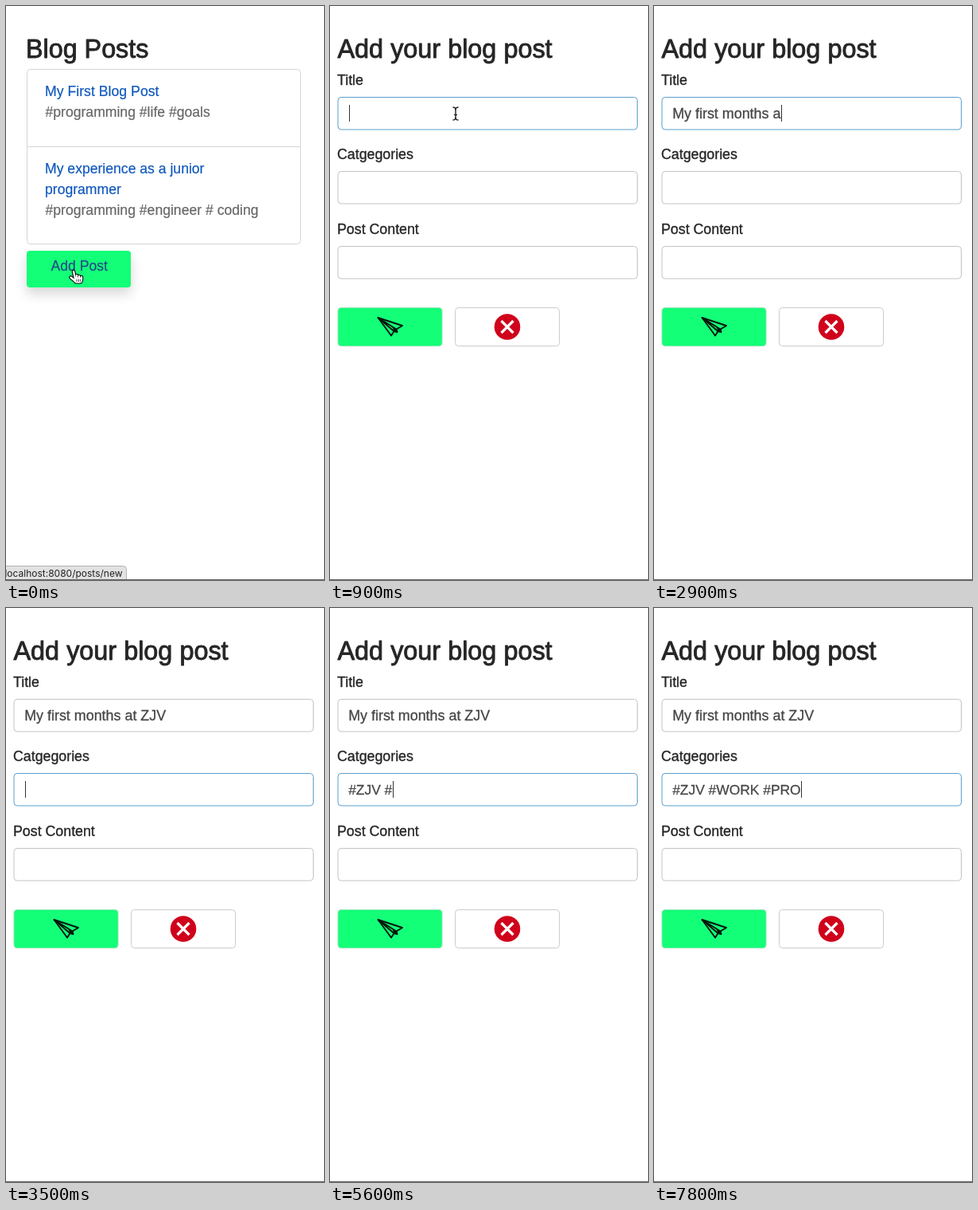
Recreate the animation shown at these times as an HTML page with a canvas. Size 400x720 px, loop 8 s.

```html
<!DOCTYPE html>
<html lang="en">
<head>
<meta charset="utf-8">
<title>Blog post form</title>
<style>
  html, body { margin: 0; width: 400px; height: 720px; overflow: hidden; background: #fff; }
  canvas { display: block; }
</style>
</head>
<body>
<canvas id="stage" width="400" height="720"></canvas>
<script>
const ctx = document.getElementById('stage').getContext('2d');
const LOOP = 8000;
const STEP = 100;
const SANS = '"Liberation Sans", Arial, sans-serif';
const GREEN = '#14ff78';
const INK = '#262626';
const PAGE_OPENS = 100, TITLE_FOCUS = 900, TITLE_TYPING = 1200, TAG_FOCUS = 3500;

const clamp = v => Math.min(1, Math.max(0, v));
const mix = (a, b, k) => a + (b - a) * k;
const ease = k => k * k * (3 - 2 * k);

// Part of a text typed by time t, one letter every `pace` ms.
const typing = (t, start, pace, str) =>
  str.slice(0, Math.max(0, 1 + Math.floor((t - start) / pace)));

const titleAt = t =>
  typing(t, TITLE_TYPING, 70, 'My first months') + typing(t, 2800, 75, ' at ZJV');

const tagsAt = t =>
  typing(t, 3700, 360, '#ZJV #') + typing(t, 5700, 260, 'WORK #PRO');

function text(str, x, y, size, color, weight = .2) {
  ctx.font = `${size}px ${SANS}`;
  ctx.fillStyle = ctx.strokeStyle = color;
  ctx.lineWidth = weight;
  ctx.lineJoin = 'round';
  ctx.fillText(str, x, y);
  ctx.strokeText(str, x, y);
}

function box(x, y, w, h, fill, stroke) {
  ctx.beginPath();
  ctx.roundRect(x + .5, y + .5, w, h, 4);
  ctx.fillStyle = fill;
  ctx.fill();
  if (stroke) {
    ctx.strokeStyle = stroke;
    ctx.lineWidth = 1;
    ctx.stroke();
  }
}

function line(x1, y1, x2, y2, color, width = 1) {
  ctx.beginPath();
  ctx.moveTo(x1, y1);
  ctx.lineTo(x2, y2);
  ctx.strokeStyle = color;
  ctx.lineWidth = width;
  ctx.stroke();
}

function at(x, y, draw) {
  ctx.save();
  ctx.translate(x, y);
  draw();
  ctx.restore();
}

// Palm and fingers as rounded strokes: a dark pass, then a thinner white one.
function hand() {
  ctx.lineCap = 'round';
  for (const [color, grow] of [['#000', 2.2], ['#fff', 0]]) {
    line(0, 2, 2, 11, color, 2.4 + grow);
    for (let i = 1; i < 4; i++) line(1 + 3 * i, 6 + i, 1 + 3 * i, 12, color, 2.4 + grow);
    line(-3.5, 9.5, 2, 14, color, 2.4 + grow);
    line(4, 13, 7.5, 13, color, 7 + grow);
  }
  for (let i = 0; i < 3; i++) line(4 + 2.4 * i, 12, 4 + 2.4 * i, 14.5, '#222', .9);
}

function arrow() {
  const path = new Path2D('M0 0V14L3.3 11L5.5 16L8 15L5.7 10H10Z');
  ctx.fillStyle = '#000';
  ctx.fill(path);
  ctx.strokeStyle = '#fff';
  ctx.stroke(path);
}

function beam() {
  line(0, -6, 0, 6, '#222', 1.4);
  line(-2, 1.5, 2, 1.5, '#222', 1.4);
  for (const s of [-1, 1]) {
    ctx.beginPath();
    ctx.moveTo(-3.5, 8 * s);
    ctx.quadraticCurveTo(0, 8 * s, 0, 5 * s);
    ctx.quadraticCurveTo(0, 8 * s, 3.5, 8 * s);
    ctx.stroke();
  }
}

function plane() {
  ctx.strokeStyle = ctx.fillStyle = '#04170c';
  ctx.lineWidth = 1.9;
  ctx.lineJoin = 'round';
  ctx.stroke(new Path2D('M-15 -11L15.5 -1L8 3.5L9 7L5 6L1.5 11.5Z'));
  ctx.stroke(new Path2D('M8 3.5L-15 -11L5 6'));
  ctx.fill(new Path2D('M3 1L8 3.5L9 7L5 6Z'));
}

function cross() {
  ctx.beginPath();
  ctx.arc(0, 0, 16.3, 0, 2 * Math.PI);
  ctx.fillStyle = '#d0021b';
  ctx.fill();
  for (const s of [-1, 1]) line(-7.5, -7.5 * s, 7.5, 7.5 * s, '#fff', 3.2);
}

function listPage() {
  const link = '#0f58bd', gray = '#666', border = '#d6d6d6';
  text('Blog Posts', 25, 65, 32.3, INK, .9);
  box(26, 79, 344, 219, '#fff', border);
  line(26, 176.5, 370, 176.5, border);
  text('My First Blog Post', 49, 112.5, 17.7, link);
  text('#programming #life #goals', 49.5, 138.5, 17.6, gray);
  text('My experience as a junior', 49, 209.5, 17.6, link);
  text('programmer', 49, 235.5, 17.6, link);
  text('#programming #engineer # coding', 49.5, 261.5, 17.6, gray);
  ctx.save();
  ctx.shadowColor = 'rgba(0,0,0,.16)';
  ctx.shadowBlur = 15;
  ctx.shadowOffsetY = 8;
  box(25.5, 306.5, 131, 46, GREEN);
  ctx.restore();
  text('Add Post', 56.5, 331.5, 17.6, '#1d4a86');
  at(85, 331, hand);
}

function field(label, top, size, value, focused) {
  text(label, 9, top - 15.5, 17.8, INK, .35);
  box(9.5, top, 376.5, 40.5, '#fff', focused ? '#5b9fd0' : '#c4c4c4');
  text(value, 23.2, top + 27, size, '#464646', .3);
  if (focused) {
    const x = Math.round(23.5 + ctx.measureText(value).width) + .5;
    line(x, top + 10, x, top + 31, '#333');
  }
}

function pointer(t) {
  const k = ease(clamp((t - 200) / 600));
  const x = mix(85, 158, k), y = mix(330, 135, k);
  at(x, y, y > 155 && y < 180 ? arrow : beam);
}

function formPage(t) {
  text('Add your blog post', 9.5, 65, 32.4, INK, .9);
  field('Title', 114, 17.9, titleAt(t), t >= TITLE_FOCUS && t < TAG_FOCUS);
  field('Catgegories', 207, 17.4, tagsAt(t), t >= TAG_FOCUS);
  field('Post Content', 301, 17.6, '', false);
  box(9.5, 378, 131, 48, GREEN, '#8fe5b3');
  box(157, 378, 131, 48, '#fff', '#ccc');
  at(75.5, 402, plane);
  at(223, 402.5, cross);
  if (t < TITLE_TYPING) pointer(t);
}

function statusBar(alpha) {
  ctx.save();
  ctx.globalAlpha = alpha;
  box(-10, 702, 161, 30, '#e2e2e2', '#b4b4b4');
  ctx.font = '12px Inter, Roboto, sans-serif';
  ctx.textAlign = 'right';
  ctx.fillStyle = '#222';
  ctx.fillText('localhost:8080/posts/new', 146.5, 716);
  ctx.restore();
}

function render(t) {
  ctx.fillStyle = '#fff';
  ctx.fillRect(0, 0, 400, 720);
  if (t < PAGE_OPENS) listPage();
  else formPage(t);
  statusBar(clamp(1 - (t - PAGE_OPENS) / 250));
  line(0, 719.5, 400, 719.5, '#666');
}

const start = performance.now();
function tick() {
  const t = (performance.now() - start) % LOOP;
  ctx.lineCap = 'butt';
  render(Math.floor(t / STEP) * STEP);
  requestAnimationFrame(tick);
}
tick();
</script>
</body>
</html>
```
